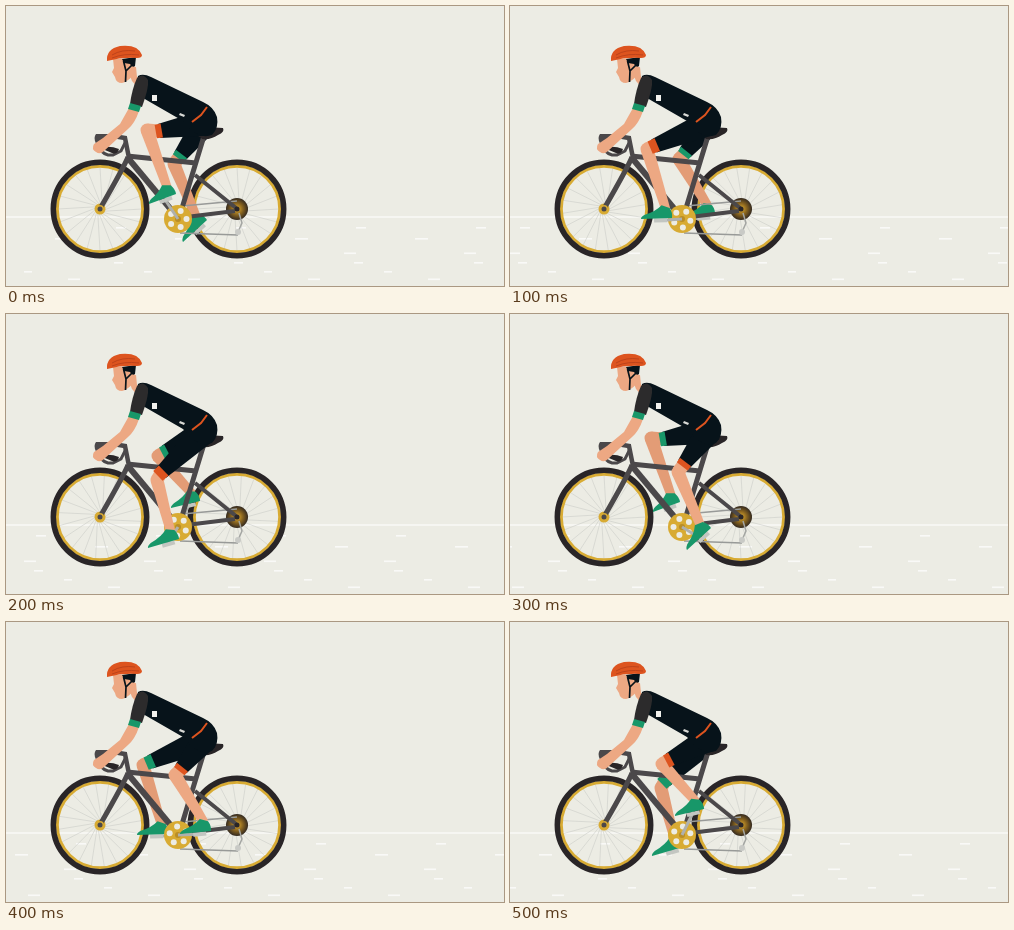
Write an HTML page with a canvas that moves like this. It is 498 px wide and 280 px high and loops after 600 ms.

```html
<!DOCTYPE html>
<html lang="en">
<head>
<meta charset="utf-8">
<title>Cyclist</title>
<style>
html, body { margin: 0; width: 100%; height: 100%; overflow: hidden; background: #ecece4; }
canvas { display: block; width: 100vw; height: 100vh; }
</style>
</head>
<body>
<canvas id="stage" width="498" height="280"></canvas>
<script>
const c = document.getElementById('stage').getContext('2d');
const STEPS = 6, STEP_MS = 100, TAU = Math.PI * 2;
const BG = '#ecece4', TYRE = '#292527', STEEL = '#4b484a', GOLD = '#d8ab33', KIT = '#07131a',
      SKIN = '#eda883', SHADE = '#e39c76', ORANGE = '#dd541f', GREEN = '#189769';

// One pedal turn in six held poses: knee, trouser cuff, sole heel, toe
const POSES = [
  [[141, 124], [153, 125], [170, 188], [143, 198]],
  [[137, 143], [144, 140], [162, 212], [131, 213]],
  [[151, 166], [155, 159], [173, 225], [142, 234]],
  [[168, 158], [174, 150], [201, 214], [177, 236]],
  [[169, 153], [175, 147], [205, 209], [174, 212]],
  [[152, 142], [159, 138], [194, 187], [165, 194]]
];
// Ground streaks: y, x, length
const STREAKS = [[221, 110, 10], [232, 49, 13], [246.5, 98, 12], [256, 108, 9], [265, 18, 8], [272.5, 62, 12]];

function fill(color, d) {
  c.fillStyle = color;
  c.fill(new Path2D(d));
}

function line(color, width, d) {
  c.strokeStyle = color;
  c.lineWidth = width;
  c.stroke(new Path2D(d));
}

function disc(color, x, y, r) {
  c.fillStyle = color;
  c.beginPath();
  c.arc(x, y, r, 0, TAU);
  c.fill();
}

function ring(color, width, x, y, r) {
  c.strokeStyle = color;
  c.lineWidth = width;
  c.beginPath();
  c.arc(x, y, r, 0, TAU);
  c.stroke();
}

// Tapered limb from a (width wa) to b (width wb)
function limb(color, a, wa, b, wb) {
  const dx = b[0] - a[0], dy = b[1] - a[1], len = Math.hypot(dx, dy);
  const nx = -dy / len / 2, ny = dx / len / 2;
  c.fillStyle = color;
  c.beginPath();
  c.moveTo(a[0] + nx * wa, a[1] + ny * wa);
  c.lineTo(b[0] + nx * wb, b[1] + ny * wb);
  c.lineTo(b[0] - nx * wb, b[1] - ny * wb);
  c.lineTo(a[0] - nx * wa, a[1] - ny * wa);
  c.fill();
}

const mix = (a, b, k) => [a[0] + (b[0] - a[0]) * k, a[1] + (b[1] - a[1]) * k];

function leg(step, trim, skin) {
  const [knee, cuff, heel, toe] = POSES[step % STEPS];
  const hip = [199, 117], pedal = mix(heel, toe, 0.4);
  const len = Math.hypot(toe[0] - heel[0], toe[1] - heel[1]);
  const cos = (toe[0] - heel[0]) / len, sin = (toe[1] - heel[1]) / len;
  // point measured along the sole and up from it
  const onFoot = (u, v) => [heel[0] + u * cos - v * sin, heel[1] + u * sin + v * cos];

  line('#aeb0ad', 3, `M172 213L${pedal[0]} ${pedal[1] + 2}`);
  limb(skin, cuff, 13, knee, 13);
  disc(skin, ...knee, 6.5);
  limb(skin, knee, 13, onFoot(6, 9), 9);
  limb(KIT, hip, 26, cuff, 14);
  limb(trim, mix(hip, cuff, 0.94), 14, mix(hip, cuff, 1.07), 13.5);

  c.save();
  c.transform(cos, sin, -sin, cos, ...heel);
  fill('#c3c6c1', 'M5 0H18V-4H5Z');
  fill(GREEN, `M0 0H${len}Q${len} 2 ${len - 4} 4Q16 7 10 13L2 10Q-1 5 0 0Z`);
  c.restore();
}

function wheel(x, spin) {
  const y = 203;
  c.strokeStyle = '#cccdc8';
  c.lineWidth = 0.6;
  c.beginPath();
  for (let i = 0; i < 20; i++) {
    const a = i * TAU / 20 - spin;
    c.moveTo(x + 4 * Math.cos(a + 0.6), y + 4 * Math.sin(a + 0.6));
    c.lineTo(x + 42 * Math.cos(a), y + 42 * Math.sin(a));
  }
  c.stroke();
  ring(GOLD, 3, x, y, 42.7);
  ring(TYRE, 5.5, x, y, 46.7);
}

function ground(t) {
  fill('#fafaf7', 'M0 210.3H498V211.7H0Z');
  c.fillStyle = 'rgba(255,255,255,.7)';
  for (const [y, x, w] of STREAKS)
    for (let k = -1; k < 5; k++)
      c.fillRect((x + 120 * t) % 120 + 120 * k, y, w, 1.6);
}

function bike(t) {
  const hub = c.createRadialGradient(231, 203, 1, 231, 203, 11);
  hub.addColorStop(0, '#d3a12c');
  hub.addColorStop(0.5, '#84611f');
  hub.addColorStop(1, '#33291f');
  disc(hub, 231, 203, 11);
  disc(GOLD, 94, 203, 5.5);

  line('#989a98', 1.3, 'M174 227L232 229M176 200L231 195');
  line('#a3a5a2', 1.5, 'M233 207L236 217L232 226');
  disc('#c9cac6', 232, 226, 3);
  line(STEEL, 4, 'M172 212L229 205M189 169L230 202');
  line(STEEL, 5, 'M198 130L173 212M121 150L190 157');
  line(STEEL, 6, 'M122 152L172 212');
  line(STEEL, 5, 'M122 151Q118 161 95 201');
  disc(GOLD, 94, 203, 4);
  disc(STEEL, 94, 203, 2.5);
  disc(TYRE, 231, 203, 2.5);

  disc(GOLD, 172, 213, 14);
  for (let i = 0; i < 5; i++) {
    const a = i * TAU / 5 - t * TAU;
    disc(BG, 172 + 8.5 * Math.cos(a), 213 + 8.5 * Math.sin(a), 3);
  }
  disc('#b98d26', 172, 213, 3);

  // saddle and handlebar
  fill(TYRE, 'M183 126Q200 120 217 122Q219 126 212 129Q205 134 196 133Q194 129 183 128Z');
  line(STEEL, 4.5, 'M92 130.5H110L119 132L123 152');
  fill(STEEL, 'M90 128H106L102 135Q97 139 90 137Q87 132 90 128Z');
  line(STEEL, 3, 'M91 136Q94 147 102 149H107L115 145L120 135');
  fill(TYRE, 'M94 142Q103 139 113 143Q111 149 106 147Z');
}

function rider() {
  fill(SKIN, 'M121 62L130 61L131 71L140 76L133 83L126 75Z');
  fill(SKIN, 'M107 53H128L129 66Q124 75 116 77Q110 77 109 71L106 66L108 62Z');
  fill(KIT, 'M116 53L130 51L129 60Q126 62 124 58L118 57Z');
  line(KIT, 1.7, 'M117.5 55L120 65L119.5 76M127 58L120 65');
  fill(ORANGE, 'M101 55Q100 43 114 40Q132 38 136 49Q136 52 131 52Q116 51 101 55Z');
  line('#bd431b', 1, 'M106 49Q116 43 129 45M106 52Q118 47 133 49');

  fill(KIT, 'M132 70Q137 67 145 71L197 96Q208 101 211 111Q213 122 206 129Q195 133 184 123L177 115L137 92L130 84Z');
  line(ORANGE, 2, 'M186 116L195 109L201 101');
  fill('#f1f1ed', 'M146 89H151V95H146Z');
  fill('#d9dad6', 'M174 107L179 109L178 111L173 109Z');

  fill(SKIN, 'M123 102L133 105Q129 117 122 123L98 145Q94 149 90 146Q85 143 88 138L97 132L114 118Z');
  fill('#2c2b2c', 'M131 72Q137 66 142 74Q143 82 136 101L124 98Q126 83 131 72Z');
  fill(GREEN, 'M124 97L135 100L133 106L122 103Z');
}

function draw(step) {
  const t = step / STEPS;
  c.fillStyle = BG;
  c.fillRect(0, 0, 498, 280);
  ground(t);
  wheel(94, t * TAU * 0.4);
  wheel(231, t * TAU * 0.4);
  leg(step + STEPS / 2, GREEN, SHADE);
  bike(t);
  leg(step, ORANGE, SKIN);
  rider();
}

// The animation is drawn "on sixes": each pose is held, then cut to the next
function tick() {
  draw(Math.floor(performance.now() / STEP_MS) % STEPS);
  requestAnimationFrame(tick);
}
tick();
</script>
</body>
</html>
```
